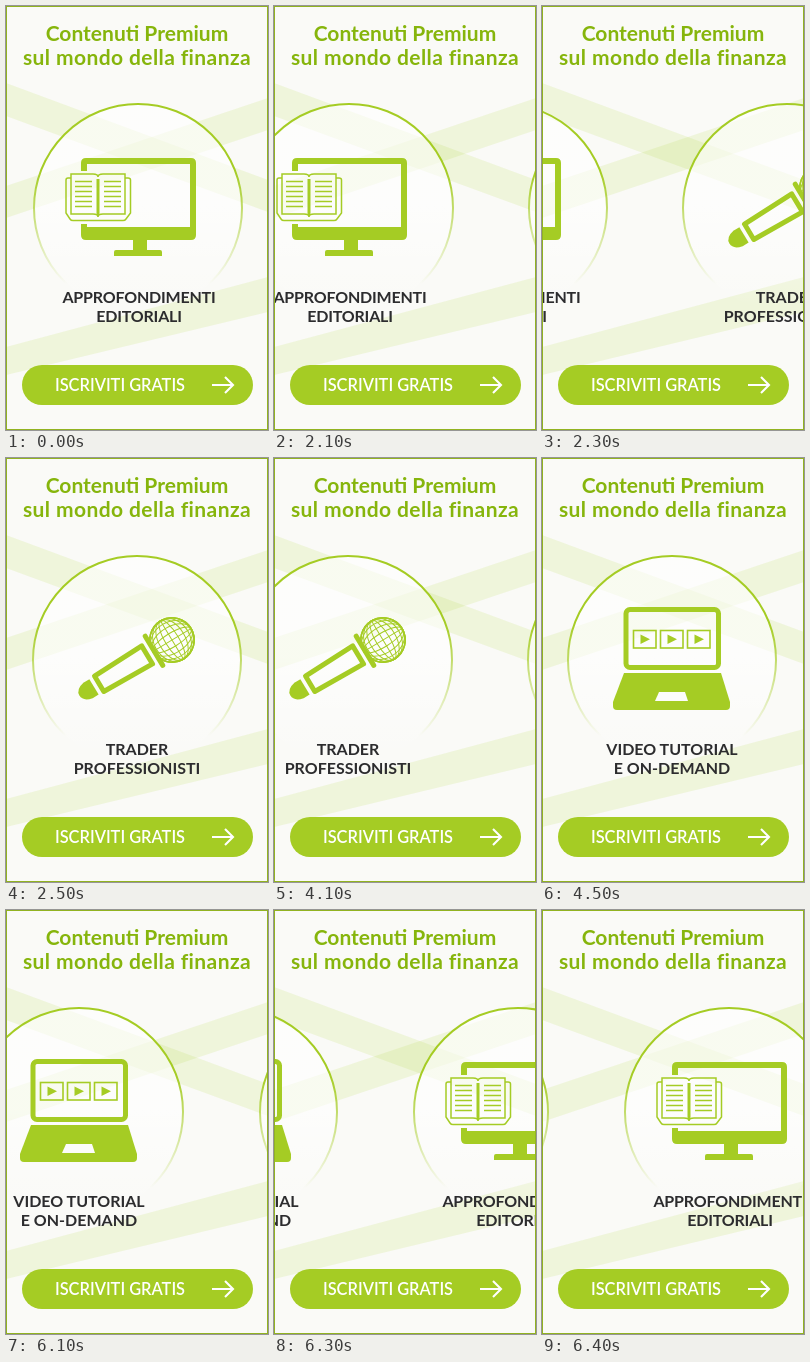
Write an HTML page that moves like this. It is 262 px wide and 424 px high and loops after 6500 ms.

```html
<!DOCTYPE html>
<html lang="it">
<head>
<meta charset="utf-8">
<style>
  html, body { margin: 0; width: 100%; height: 100%; overflow: hidden; background: #fafaf7; }
  svg { display: block; width: 262px; height: 424px; font-family: Lato, "Open Sans", sans-serif; }
  text { text-anchor: middle; }
  .title { font-size: 21px; font-weight: 700; fill: #86b50c; }
  .label { font-size: 16px; font-weight: 700; fill: #2c2c2e; }
  .cta { font-size: 16.4px; font-weight: 600; fill: #fff; }
  .line { fill: none; stroke: #a5cc24; }
  .solid { fill: #a5cc24; }
  .paper { fill: #fcfcfa; }
</style>
</head>
<body>
<svg viewBox="0 0 262 424">
  <defs>
    <linearGradient id="ring" gradientUnits="userSpaceOnUse" x1="0" y1="165" x2="0" y2="278">
      <stop stop-color="#a5cc24"/>
      <stop offset="1" stop-color="#a5cc24" stop-opacity="0"/>
    </linearGradient>
    <linearGradient id="disc" gradientUnits="userSpaceOnUse" x1="0" y1="200" x2="0" y2="300">
      <stop stop-color="#fff" stop-opacity=".6"/>
      <stop offset="1" stop-color="#fff" stop-opacity="0"/>
    </linearGradient>
    <clipPath id="inside"><rect x="1" y="1" width="260" height="422"/></clipPath>

    <circle id="circle" cx="132" cy="202" r="104" fill="url(#disc)" stroke="url(#ring)" stroke-width="2"/>

    <g id="editorial">
      <use href="#circle"/>
      <g class="solid">
        <path d="M75 165V157Q75 152 80 152H185Q190 152 190 157V229Q190 234 185 234H80Q75 234 75 229V218H81V221H184V158H81V165Z"/>
        <path d="M127 234H141V244H154Q156 244 156 246V250H108V246Q108 244 110 244H127Z"/>
      </g>
      <g class="line" stroke-width="1.5">
        <path d="M65 172H62Q60 172 60 174V207L64 213Q65 214.500 67 214.500H117Q119 214.500 120 213L124.500 207V174Q124.500 172 122 172H119"/>
        <path d="M65 168H87Q92 168 92 171Q92 168 97 168H119V208H97Q92 208 92 211Q92 208 87 208H65Z"/>
        <path d="M92 173V209" stroke-width="3"/>
        <path id="rules"/>
      </g>
      <g letter-spacing="-.2">
        <text class="label" x="133" y="297">APPROFONDIMENTI</text>
        <text class="label" x="133" y="316">EDITORIALI</text>
      </g>
    </g>
  </defs>

  <rect width="262" height="424" fill="#fafaf7"/>
  <g class="solid" opacity="1" fill-opacity=".13">
    <path d="M0 77L262 174V206L0 110Z"/>
    <path d="M262 92V124L0 212V180Z"/>
    <path d="M262 271V306L0 369V341Z"/>
  </g>

  <g clip-path="url(#inside)">
    <g id="strip">
      <use href="#editorial"/>

      <g transform="translate(284)">
        <use href="#circle"/>
        <g transform="translate(167 182) rotate(-31)">
          <g class="line">
            <g id="mesh" stroke-width="1"/>
            <path d="M-21 -17V17" stroke-width="5" stroke-linecap="round"/>
            <path d="M-29 -10.500V10.500L-85 9V-9Z" stroke-width="5" stroke-linejoin="round"/>
          </g>
          <path class="solid" d="M-91 -9V9H-98Q-108 7 -108 0T-98 -9Z"/>
        </g>
        <text class="label" x="132" y="297">TRADER</text>
        <text class="label" x="132" y="316">PROFESSIONISTI</text>
      </g>

      <g transform="translate(568)">
        <use href="#circle"/>
        <g transform="translate(2)">
          <rect class="line" x="84" y="151.500" width="92.500" height="58" rx="4" stroke-width="5"/>
          <path class="solid" d="M82 215H179L188 244V248Q188 252 184 252H75Q71 252 71 248V244Z"/>
          <path class="paper" d="M117 234H143L146 243H113Z"/>
          <g id="clips"/>
        </g>
        <text class="label" x="132" y="297">VIDEO TUTORIAL</text>
        <text class="label" x="132" y="316">E ON-DEMAND</text>
      </g>

      <use href="#editorial" x="853"/>
    </g>
  </g>

  <text class="title" x="131" y="35">Contenuti Premium</text>
  <text class="title" x="131" y="59" letter-spacing=".4">sul mondo della finanza</text>

  <rect class="solid" x="16" y="359" width="231" height="40" rx="20"/>
  <text class="cta" x="114" y="385">ISCRIVITI GRATIS</text>
  <path d="M206 379H227M219 371L227 379L219 387" fill="none" stroke="#fff" stroke-width="2.1"/>
  <rect x=".5" y=".5" width="261" height="423" fill="none" stroke="#92b321"/>
</svg>
<script>
  const STEP = 57, STEP_MS = 100, STEPS = 5, LOOP = 6500;
  const MOVES = [2100, 4100, 6100];
  const $ = id => document.getElementById(id);

  // Lines of writing on both pages of the book
  let rules = "";
  for (let y = 175.5; y < 205; y += 5) rules += `M69 ${y}H86M98 ${y}H115`;
  $("rules").setAttribute("d", rules);

  // Microphone grille: meridians both ways over a sphere
  const R = 22.5;
  $("mesh").innerHTML = [0, 1, 2, 3, 4, 5].map(i => {
    const r = R * Math.sin(i * Math.PI / 10);
    return `<ellipse rx="${r}" ry="${R}"/><ellipse rx="${R}" ry="${r}"/>`;
  }).join("") + `<path d="M${-R} 0H${R}M0 ${-R}V${R}"/>`;

  $("clips").innerHTML = [91.5, 118.5, 145.5].map(x =>
    `<rect class="line" x="${x}" y="172.500" width="22.500" height="17.500" stroke-width="1.6"/>
     <path class="solid" d="M${x + 7} 176.500L${x + 16.5} 181.250L${x + 7} 186Z"/>`).join("");

  function draw(now) {
    const t = now % LOOP;
    const steps = MOVES.reduce((sum, start) =>
      sum + Math.max(0, Math.min(STEPS, Math.floor((t - start) / STEP_MS) + 1)), 0);
    $("strip").setAttribute("transform", `translate(${-STEP * steps})`);
  }

  const begin = performance.now();
  function tick() {
    draw(performance.now() - begin);
    requestAnimationFrame(tick);
  }
  tick();
</script>
</body>
</html>
```
